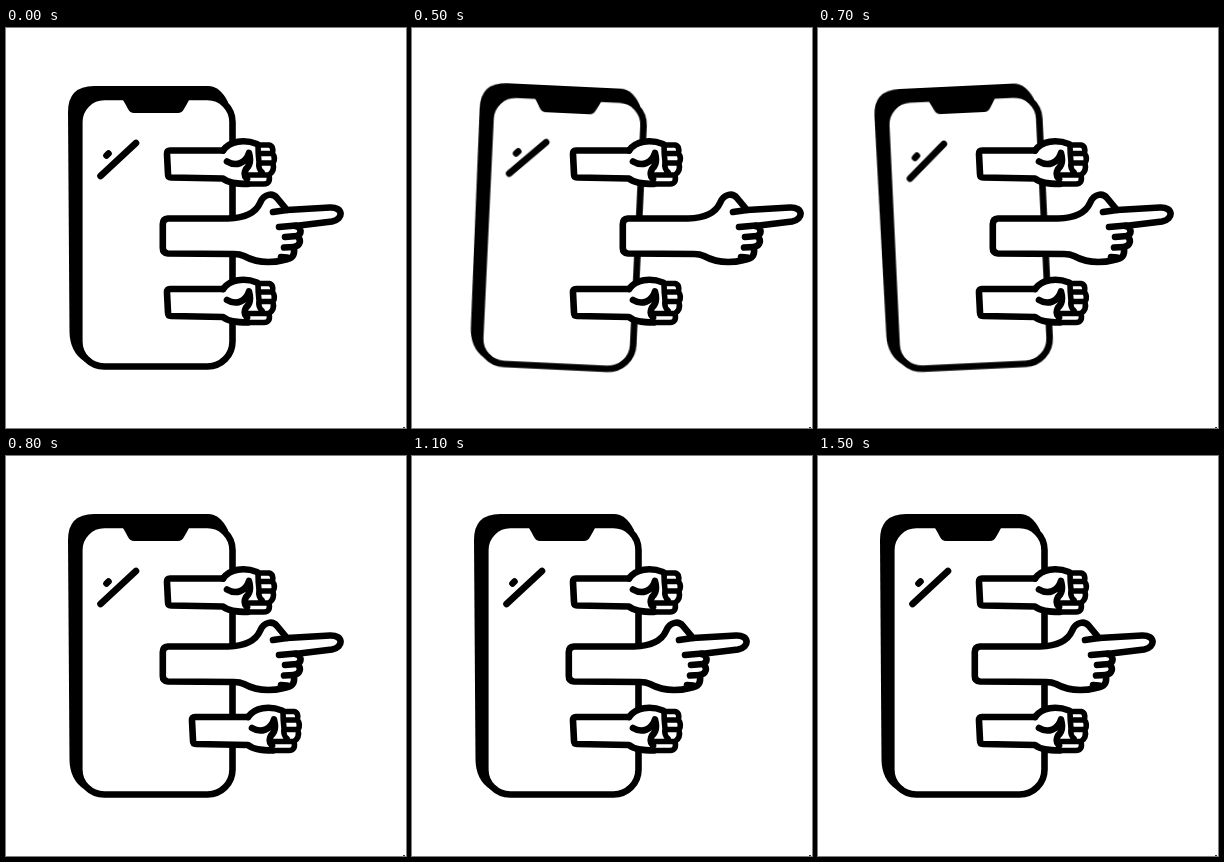
Recreate the animation shown at these times as an HTML page. Size 400 by 400 pixels, loop 2 s.

```html
<!DOCTYPE html>
<html lang="en">
<head>
<meta charset="utf-8">
<title>Punching phone</title>
<style>
  html, body { margin: 0; width: 100%; height: 100%; overflow: hidden; background: #fff; }
  svg { display: block; width: 100%; height: 100%; }
  .ink { fill: none; stroke: #000; stroke-width: 6.6; stroke-linecap: round; stroke-linejoin: round; }
  .fill { fill: #fff; }
  .bare { stroke: none; }
  .fine { stroke-width: 5.6; }
  .phone, .point, .low, .high { animation: 2s step-end infinite; }
  .phone { animation-name: rock; transform-origin: 148px 203px; }
  .point { animation-name: point; }
  .low { animation-name: jab; }
  .high { animation-name: uppercut; transform-origin: 160px 136px; }

  /* Poses are held for 100 ms, which is 5% of the loop */
  @keyframes rock {
    0%, 30%, 40%, 100% { transform: none; }
    20% { transform: rotate(1.35deg); }
    25% { transform: rotate(2.7deg); }
    35% { transform: rotate(-2.7deg); }
  }
  @keyframes point {
    0%, 40%, 100% { transform: none; }
    20% { transform: translateX(27px); }
    25% { transform: translateX(54px); }
    30% { transform: translateX(36px); }
    35% { transform: translateX(18px); }
  }
  @keyframes jab {
    0%, 55%, 100% { transform: none; }
    40% { transform: translateX(25px); }
    45% { transform: translateX(50.5px); }
    50% { transform: translateX(16px); }
  }
  @keyframes uppercut {
    0%, 75%, 100% { transform: none; }
    60% { transform: translate(34px, -9px) rotate(-6deg); }
    65% { transform: translate(68px, -18px) rotate(-12deg); }
    70% { transform: translate(11px, 1px) rotate(1deg); }
  }
</style>
</head>
<body>
<svg viewBox="0 0 400 400">
  <defs>
    <g id="fist" class="ink">
      <path class="fill bare" d="M160 122H217L232 114H251L266 117L269 130L262 156H242L217 150H161Z"/>
      <path d="M217 122.500H164Q161 122.500 161 126L162 146Q162 149.500 165 149.500L217 150.500
        C222 155 231 156 242 156"/>
      <path d="M217 122.500C224 113 238 111 251 116M221 133.500C230 139 240 135 243 125Q246 136 240 141Q237 147 241 151"/>
      <path class="fine" d="M252 117H263Q268 118 266.500 125.500Q270 130 267 135.500Q269 143 263 147Q265 156 258 156H242
        M252 117Q252 126 253 134Q252 141 256 144M253 125.500H266M254 135H267M243 147H263"/>
    </g>
  </defs>

  <g class="phone">
    <path d="M62 84Q62 58 88 58H202Q214 58 222 74L210 320L78 333Q64 324 63.500 304Z"/>
    <rect class="ink fill" x="73.300" y="69" width="153.200" height="269.500" rx="25"/>
    <path d="M114 70L117 72Q120 77 122 81Q124 85 128 85H172Q176 85 178 81Q181 76 183 72L186 70Z"/>
    <path class="ink" d="M94.500 148L130 115M100.500 127.500L102.500 125.500"/>
  </g>

  <g class="high"><use href="#fist"/></g>
  <g class="low"><use href="#fist" y="138.500"/></g>

  <g class="point ink">
    <path class="fill" d="M162 190.500L222 190.500C240 190 250 184 254 175C258 165 267 165 271 170L281 182
      L324 179.500C337.500 179 338 191 326 193.500L289 198C296 199 296 206 291 208C296 212 294 218 288 219
      C289 228 286 231 278 232C262 236 249 234 238 228Q234 226 228 226L162 225.500Q156.800 225 156.800 220V196Q156.800 191 162 190.500Z"/>
    <path d="M267 184L281 182M273 199L290 197.500M279 209L291 208M278 219.500L288 219M275 229L281 229.500"/>
  </g>

  <rect x="397" y="399" width="2" height="1" fill="#333"/>
</svg>
</body>
</html>
```
